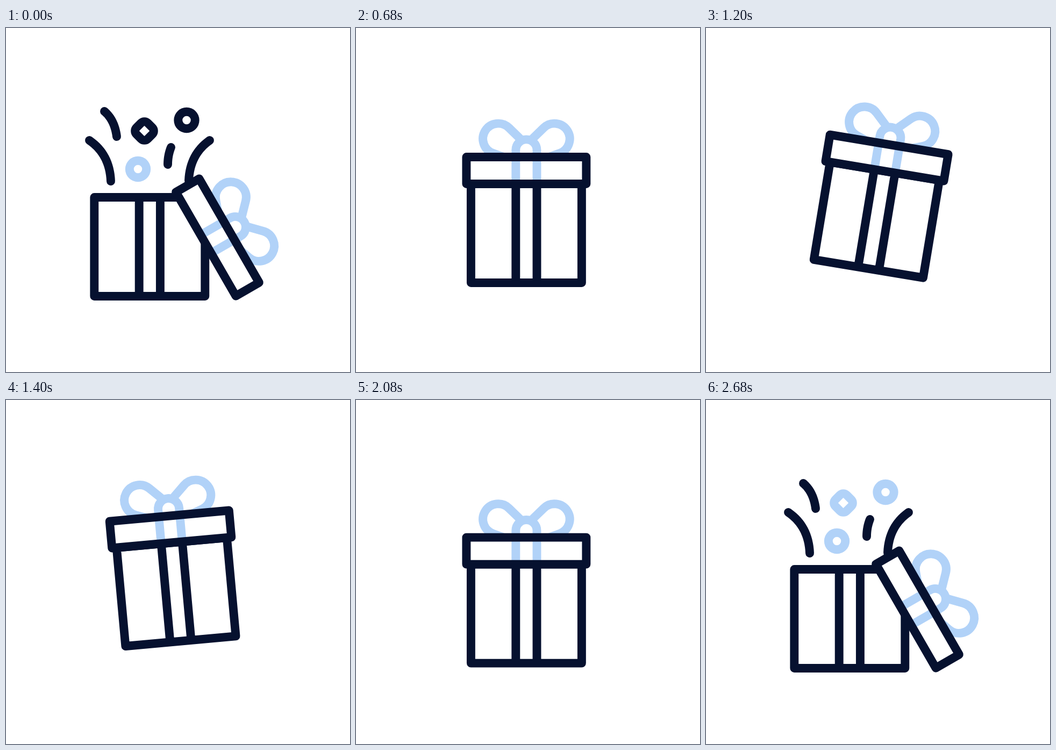
Animation, 640 px wide and 640 px high, one loop 3000 ms. Source, as an HTML page with a canvas:

```html
<!DOCTYPE html>
<html lang="en">
<head>
<meta charset="utf-8">
<title>Gift box</title>
<style>
  html, body { margin: 0; width: 100%; height: 100%; overflow: hidden; background: #fff; }
  canvas { display: block; width: 100vw; height: 100vh; }
</style>
</head>
<body>
<canvas width="640" height="640"></canvas>
<script>
const ctx = document.querySelector('canvas').getContext('2d');
const DARK = '#06112f', LIGHT = '#b1d2f8';
const LOOP = 3000, STEP = 40;
const CENTER = 316.9, BASE = 499, RIBBON = 19.6;

// Curved streaks: outer end, control point, inner end
const streaks = [
  [153, 209, 191, 235, 193, 285],
  [181, 155, 200, 171, 204, 202],
  [305, 222, 299, 237, 299, 254],
  [377, 209, 340, 235, 338, 284],
];

const bow = new Path2D();
for (const side of [-1, 1]) {
  const loop = new Path2D('M-12.5-60L-32.3-79.2A28.5 28.5 0 1 0-61.8-32L-20-17');
  bow.addPath(loop, new DOMMatrix([-side, 0, 0, 1, 0, 0]));
}
const ribbon = new Path2D(`M${-RIBBON} 25V-38A${RIBBON} ${RIBBON} 0 0 1 ${RIBBON}-38V25`);
const lid = new Path2D('M-111.5-25H111.5V25H-111.5Z');
const box = new Path2D(`M-103-184H103V0H-103ZM${-RIBBON}-184V0M${RIBBON}-184V0`);
const ring = new Path2D();
ring.arc(0, 0, 15.7, 0, 7);
const diamond = new Path2D();
diamond.roundRect(-14.8, -14.8, 29.6, 29.6, 8.6);

const lerp = (a, b, k) => a + (b - a) * k;
const ramp = (t, from, to) => Math.min(1, Math.max(0, (t - from) / (to - from)));
const ease = (t, from, to) => {
  const k = ramp(t, from, to);
  return k * k * (3 - 2 * k);
};
const bezier = (u, c1, c2, end) =>
  3 * (1 - u) ** 2 * u * c1 + 3 * (1 - u) * u * u * c2 + u ** 3 * end;

function stroke(path, color) {
  ctx.strokeStyle = color;
  ctx.stroke(path);
}

function place(x, y, degrees, scale, draw) {
  ctx.save();
  ctx.translate(x, y);
  ctx.rotate(degrees * Math.PI / 180);
  ctx.scale(scale, scale);
  draw();
  ctx.restore();
}

function drawStreak([x0, y0, x1, y1, x2, y2], from, to) {
  if (to - from <= 0) return;
  const path = new Path2D();
  for (let i = 0; i <= 16; i++) {
    const u = lerp(from, to, i / 16), v = 1 - u;
    path.lineTo(v * v * x0 + 2 * v * u * x1 + u * u * x2,
                v * v * y0 + 2 * v * u * y1 + u * u * y2);
  }
  stroke(path, DARK);
}

function drawShapes(color, scale, turn) {
  if (scale <= 0) return;
  place(255.5, 191.5, 45 + turn, scale, () => stroke(diamond, color));
  place(334, 171.5, 0, scale, () => stroke(ring, color));
  place(243.5, 262.5, 0, scale, () => stroke(ring, LIGHT));
}

function drawConfetti(t, shift) {
  if (t < 400) {
    place(2, 0, 0, 1, () => {
      streaks.forEach((s, i) => drawStreak(s, 0, 1 - ease(t, 0, i ? 310 : 333)));
      drawShapes(DARK, 1 - ease(t, 0, 310), 0);
    });
  } else if (t > 2167) {
    const rise = ease(t, 2167, 2667);
    const grow = ease(t, 2360, 2667);
    place(shift + 49.6, 207 * (1 - rise), 0, 1, () => {
      streaks.forEach(s => drawStreak(s, 1 - grow, 1));
      drawShapes(LIGHT, 1, 55 * (1 - rise));
    });
  }
}

function drawGift(t, shift) {
  const slide = t < 1000 ? 1 - ease(t, 333, 500) : ease(t, 2167, 2333);
  const tip = t < 1000 ? 1 - ease(t, 0, 333) : ease(t, 2333, 2667);
  const lidX = bezier(slide, 20, 90, 104.5) + 21.7 * tip;
  const lidY = bezier(slide, -40, -115, -42) + 141.5 * tip;

  ctx.fillStyle = '#fff';
  place(shift, 0, 0, 1, () => {
    place(CENTER, BASE, 0, 1, () => {
      ctx.fillRect(-103, -184, 206, 184);
      stroke(box, DARK);
    });
    place(CENTER + lidX, 290 + lidY, 60 * tip, 1, () => {
      stroke(bow, LIGHT);
      ctx.fill(lid);
      ctx.lineCap = 'butt';
      stroke(ribbon, LIGHT);
      stroke(lid, DARK);
    });
  });
}

function draw(t) {
  ctx.fillStyle = '#fff';
  ctx.fillRect(0, 0, 640, 640);
  ctx.lineWidth = 15.9;
  ctx.lineCap = ctx.lineJoin = 'round';

  const k = ramp(t, 2167, 2667);
  const away = t < 1000 ? 1 - ease(t, 0, 333) : k * (1.3 - 0.3 * k);
  const shift = -49.6 * away;
  drawConfetti(t, shift);

  const jump = 50 * (ease(t, 510, 850) - ease(t, 1845, 2170));
  const tilt = 10 * ease(t, 843, 1165) - 20 * ease(t, 1165, 1510) + 10 * ease(t, 1510, 1850);
  place(CENTER, 410 - jump, tilt, 1, () => {
    ctx.translate(-CENTER, -410);
    drawGift(t, shift);
  });
}

function tick(now) {
  draw(Math.floor(now % LOOP / STEP) * STEP);
  requestAnimationFrame(tick);
}
requestAnimationFrame(tick);
</script>
</body>
</html>
```
